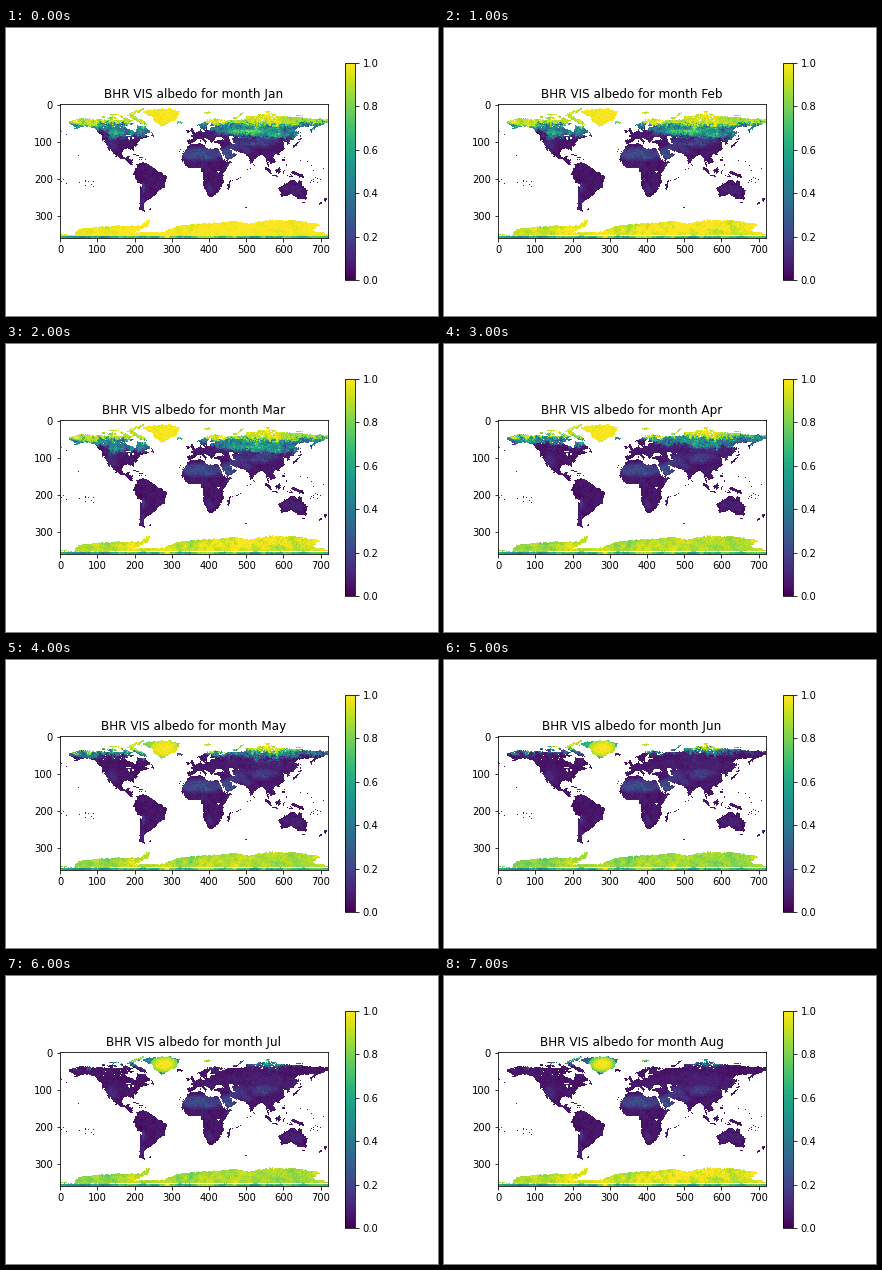
Recreate the animation shown at these times as a matplotlib script. Size 432 by 288 pixels, loop 8000 ms.

```python
import numpy as np
import matplotlib.pyplot as plt
from matplotlib.animation import FuncAnimation
from matplotlib.path import Path

MONTHS = ["Jan", "Feb", "Mar", "Apr", "May", "Jun", "Jul", "Aug"]
FOREST_LINE = [47, 47, 49, 57, 63.5, 68.5, 73, 75]   # southern limit of thin snow
TUNDRA_LINE = [63, 62, 64, 67, 70, 74, 79, 82]       # southern limit of full snow
STEPPE = [0.34, 0.32, 0.2, 0.02, 0, 0, 0, 0]
ICE = [0.99, 0.95, 0.92, 0.88, 0.87, 0.84, 0.86, 0.92]

# Coastlines as (longitude, latitude), roughened later
AMERICA_NORTH = [
    (-167, 66), (-156, 71), (-128, 70), (-95, 68), (-94, 72), (-81, 69), (-87, 64),
    (-94, 59), (-82, 55), (-80, 51), (-77, 56), (-77, 62), (-65, 60), (-56, 52),
    (-66, 50), (-60, 46), (-70, 43), (-76, 36), (-81, 31), (-124, 41), (-124, 48),
    (-133, 57), (-146, 61), (-163, 55), (-158, 59), (-166, 62)]
AMERICA_MID = [
    (-122, 41), (-80, 33), (-80, 26), (-84, 30), (-94, 30), (-97, 27), (-96, 19),
    (-92, 18), (-87, 21), (-88, 16), (-83, 15), (-83, 10), (-77, 8.5), (-84, 8.5),
    (-94, 16), (-105, 20), (-114, 31), (-110, 23), (-117, 32)]
AMERICA_SOUTH = [
    (-77, 8), (-72, 12), (-62, 10.5), (-50, 1), (-35, -6), (-39, -14), (-41, -22),
    (-48, -26), (-57, -37), (-65, -41), (-68, -50), (-66, -55), (-74, -52),
    (-73, -37), (-70, -18), (-76, -14), (-81, -5)]
AFRICA = [
    (-6, 36), (10, 37), (19, 30), (32, 31), (37, 20), (43, 12), (51, 12), (40, -3),
    (40, -15), (35, -24), (27, -34), (19, -34.5), (12, -17), (13, -9), (9, 4),
    (-8, 4.5), (-17, 14), (-17, 21), (-10, 30)]
EUROPE = [
    (-9, 43), (-1.5, 43.5), (-4, 48.5), (8, 54), (10, 57.5), (11, 54), (20, 55),
    (24, 59), (31, 60), (31, 64), (44, 66), (60, 69), (60, 48), (48, 46), (49, 41),
    (41, 41.5), (37, 46), (30, 46), (28, 41), (23, 37), (19, 42), (13, 45),
    (18, 40), (16, 38), (9, 44), (3, 43), (-2, 37), (-9, 37)]
SCANDINAVIA = [
    (33, 60), (22, 60.5), (24, 66), (17, 61), (16, 56), (13, 55.5), (8, 58), (5, 61),
    (17, 69), (28, 71), (41, 67), (34, 66.5)]
ASIA_NORTH = [
    (45, 68), (68, 69), (69, 73), (87, 75), (104, 77.6), (113, 74), (140, 72.5),
    (180, 69), (180, 65), (163, 59), (157, 51), (156, 57), (162, 61), (143, 59),
    (135, 55), (141, 52), (139, 47), (128, 40), (129, 36), (126, 35), (125, 39),
    (118, 39), (122, 37), (120, 35), (122, 30), (114, 22), (100, 23), (60, 40),
    (53, 46), (45, 55)]
ASIA_SOUTH = [
    (27, 40), (35, 42), (48, 42), (50, 37), (54, 37), (52, 44), (100, 40), (110, 22),
    (106, 19), (109, 12), (105, 9), (100, 13), (104, 1.5), (98, 9), (97, 17),
    (91, 22.5), (80, 15), (77.5, 8), (73, 20), (66, 25), (57, 26), (49, 30),
    (52, 24.5), (59.5, 22), (45, 13), (35, 28), (36, 36.5), (28, 37)]
AUSTRALIA = [
    (114, -22), (122, -18), (131, -12), (136, -12), (139, -17), (142.5, -11),
    (146, -19), (153, -27), (150, -37), (141, -38), (131, -31.5), (117, -35)]
GREENLAND = [
    (-72, 78), (-60, 82), (-32, 83.5), (-18, 80), (-23, 70), (-43, 60), (-53, 67),
    (-56, 74)]
ANTARCTICA = [
    (-180, -84.5), (-160, -85), (-156, -77.5), (-115, -74), (-72, -73), (-58, -63.5),
    (-62, -74), (-80, -82), (-45, -82), (-30, -78), (-15, -72), (40, -69), (53, -66),
    (72, -71), (100, -66), (135, -66), (170, -71.5), (160, -80), (180, -84.5),
    (180, -90), (-180, -90)]

# Islands as lon, lat, rx, ry, tilt
ARCTIC = [
    (-75, 68.5, 13, 2.8, -27), (-77, 80, 11, 2.2, 18), (-110, 71, 6, 1.9, 0),
    (-121, 73, 3, 1.2, 0), (60, 74, 8.5, 1.2, 33), (18, 78.5, 6, 1.5, 0),
    (-97, 73, 3, 1.2, 0), (-85, 75.3, 5, 0.8, 0), (-108, 76, 7, 0.9, 0),
    (98, 79.5, 4, 0.9, 0), (-84, 64, 2.6, 1.4, 0), (143, 75, 5, 0.6, 0)]
ISLANDS = [
    (-2.5, 53.7, 2.1, 4.2, 18), (-8, 53.2, 1.8, 1.8, 0), (-18.5, 65, 4.5, 1.4, 0),
    (137, 35.7, 6.5, 1.3, 38), (143, 43.3, 2, 1.2, 0), (142.8, 50, 0.7, 4, 0),
    (101, 0, 7.5, 1.4, -47), (110, -7.3, 4.6, 0.7, -8), (113.8, 1, 3.2, 4.5, -30),
    (121, -2, 1.2, 3.3, 0), (121.5, 16, 1.2, 2.7, 0), (124.8, 8, 1.6, 1.5, 0),
    (140.5, -5.2, 9.5, 2.2, -22), (176, -39, 1.5, 2.7, 0), (170.3, -43.8, 4.2, 1.2, 48),
    (146.5, -42, 1.7, 1.4, 0), (46.9, -19, 1.8, 6.5, -15), (-79, 21.8, 4.8, 0.6, -18),
    (-71.3, 18.9, 2.7, 0.8, 0), (-56, 49, 2.4, 1.8, 0), (81, 7.5, 1, 1.7, 0),
    (9, 40.5, 0.8, 1.6, 0), (14.2, 37.5, 1.5, 0.8, 0), (-59.3, -51.7, 1.6, 0.7, 0)]
LAKES = [
    (-87.5, 47.7, 3.4, 0.9), (-87, 43.8, 0.9, 2), (-82, 44.5, 1.4, 1.3),
    (-98, 52.5, 0.8, 1.6), (33, -1, 1.5, 1.4), (60, 45, 1.2, 1)]
# Archipelagos: lon, lat, spread, count
SCATTER = [
    (-145, -17, 11, 14), (-172, -14, 7, 8), (163, -12, 7, 14), (158, 8, 16, 10),
    (-68, 18, 6, 9), (73, 2, 4, 5), (-157, 20.5, 2, 4), (56, -10, 7, 8),
    (-18, 28, 4, 4), (-176, 52, 6, 5), (128, -6, 5, 14), (69.5, -49, 1, 4)]
# Bright dry ground: lon, lat, rx, ry, extra albedo
DRY = [
    (10, 23, 29, 9, 0.17), (46, 23, 11, 9, 0.16), (60, 35, 12, 9, 0.09),
    (92, 40, 19, 5, 0.11), (72, 27, 6, 5, 0.07), (89, 34, 11, 4, 0.08),
    (132, -25, 15, 7, 0.045), (20, -25, 6, 7, 0.06), (-111, 34, 8, 9, 0.06),
    (-69, -44, 4, 9, 0.05), (-68, -22, 2, 7, 0.1), (48, 7, 5, 5, 0.07)]

rng = np.random.default_rng(7)
LON, LAT = np.meshgrid(np.arange(720) / 2 - 179.75, 89.75 - np.arange(360) / 2)


def noise(power):
    """Periodic random texture of unit spread; higher power is smoother."""
    fx, fy = np.meshgrid(np.fft.fftfreq(720) * 720, np.fft.fftfreq(360) * 720)
    spectrum = np.fft.fft2(rng.normal(size=LON.shape))
    field = np.fft.ifft2(spectrum / (8 + np.hypot(fx, fy)) ** power).real
    return (field - field.mean()) / field.std()


def step(x, width):
    return 1 / (1 + np.exp(-np.clip(x / width, -50, 50)))


FINE, ROUGH, SMOOTH = noise(0.6), noise(1.2), noise(1.8)
WARP_LON = LON + 0.65 * noise(1.2)
WARP_LAT = LAT + 0.5 * noise(1.2)


def blob(lon, lat, rx, ry, x=LON, y=LAT):
    return ((x - lon) / rx) ** 2 + ((y - lat) / ry) ** 2


def bump(*spec):
    return np.exp(-blob(*spec) ** 2)


def island(lon, lat, rx, ry, tilt):
    c, s = np.cos(np.radians(tilt)), np.sin(np.radians(tilt))
    dx, dy = WARP_LON - lon, WARP_LAT - lat
    return blob(0, 0, rx, ry, c * dx + s * dy, c * dy - s * dx) < 1


def inside(points):
    (x0, y0), (x1, y1) = np.min(points, 0) - 3, np.max(points, 0) + 3
    near = (LON > x0) & (LON < x1) & (LAT > y0) & (LAT < y1)
    hit = np.zeros(LON.shape, bool)
    warped = np.column_stack([WARP_LON[near], WARP_LAT[near]])
    hit[near] = Path(points).contains_points(warped)
    return hit


south_ice = inside(ANTARCTICA) | (LAT < -87)
greenland = inside(GREENLAND)
land = np.zeros(LON.shape, bool)
for coast in (AMERICA_NORTH, AMERICA_MID, AMERICA_SOUTH, AFRICA, EUROPE,
              SCANDINAVIA, ASIA_NORTH, ASIA_SOUTH, AUSTRALIA):
    land |= inside(coast)
for spec in ARCTIC + ISLANDS:
    land |= island(*spec)
for spec in LAKES:
    land &= blob(*spec) > 1
for lon, lat, spread, count in SCATTER:
    for dx, dy in rng.uniform(-1, 1, (count, 2)) * spread:
        x = int((lon + dx + 180) * 2) % 720
        y = int((90 - lat - 0.5 * dy) * 2)
        land[y:y + 2, x:x + 2] = True
# Lake country of the far north
land &= ~((LON < -75) & (LON > -128) & (LAT > 56) & (FINE > 1.9))
land &= ~((LAT > 67) & (ROUGH + FINE > 2.5))
land |= greenland | south_ice

ground = 0.055 + 0.012 * FINE + 0.012 * ROUGH
for *place, gain in DRY:
    ground += gain * bump(*place) * (1 + 0.12 * SMOOTH + 0.12 * FINE)
ground += 0.03 * step(LAT - 42, 3) * step(LON - 20, 10) * step(57 - LAT, 2)

# Mild coasts push the snow line north, the dry interior keeps it south
shift = (13 * bump(5, 52, 24, 16) + 10 * bump(-128, 50, 12, 9)
         + 4 * bump(-160, 58, 12, 4) - 3 * bump(100, 50, 30, 9))
steppe = bump(68, 52.5, 24, 4) + 0.6 * bump(-104, 52, 12, 4) + 0.4 * bump(112, 48, 14, 4)
peaks = bump(80, 37, 12, 3) + bump(88, 49, 9, 3) + bump(-115, 49, 6, 6)
rim = step(SMOOTH + 0.5 * ROUGH, 0.4)
core = bump(-40, 73.5, 17, 10.5)
east = bump(95, -74, 75, 8)


def albedo(i):
    wander = 1.8 * SMOOTH + 1.2 * ROUGH + 0.8 * FINE
    thin = step(LAT - FOREST_LINE[i] - shift + wander, 1.3)
    full = step(LAT - TUNDRA_LINE[i] - 0.3 * shift + wander, 1.1)
    forest = 0.43 + 0.08 * ROUGH + 0.05 * FINE + STEPPE[i] * steppe
    tundra = 0.91 + 0.04 * ROUGH
    value = ground + (forest - ground) * thin
    value += (tundra - value) * full
    value += 0.6 * STEPPE[i] * peaks * rim * (1 - thin)

    melt = max(0, i - 3) / 4
    cap = 0.99 - 0.35 * melt * (1 - core) + 0.02 * FINE
    value = np.where(greenland, cap - 0.35 * melt * (core < 0.25), value)

    spread = 0.02 if i == 0 else 0.035
    ice = ICE[i] + spread * (ROUGH + 0.6 * SMOOTH)
    if i in (1, 2, 7):
        ice += 0.06 * east * rim
    ice = np.where(LAT < -87.3, 0.68 + 0.12 * SMOOTH, ice)
    value = np.where(south_ice, ice, value)

    hidden = ~land
    if i > 0:
        hidden = hidden | ((LAT < -86) & (LAT > -87.4) & (SMOOTH > -0.9))
    return np.ma.masked_array(np.clip(value, 0.01, 1), hidden)


fig, ax = plt.subplots(figsize=(6, 4), dpi=72, facecolor="white")
fig.subplots_adjust(left=0.125, right=0.9, bottom=0.125, top=0.88)
maps = [albedo(i) for i in range(len(MONTHS))]
image = ax.imshow(maps[0], cmap="viridis", vmin=0, vmax=1, interpolation="nearest")
ax.set_xticks(range(0, 701, 100))
ax.set_yticks(range(0, 301, 100))
title = ax.set_title("", fontsize=12)
fig.colorbar(image, ax=ax, ticks=np.linspace(0, 1, 6))


def draw(i):
    image.set_data(maps[i])
    title.set_text(f"BHR VIS albedo for month {MONTHS[i]}")
    return image, title


anim = FuncAnimation(fig, draw, frames=len(MONTHS), interval=1000, repeat=True,
                     repeat_delay=0, blit=False)
plt.show()
```
